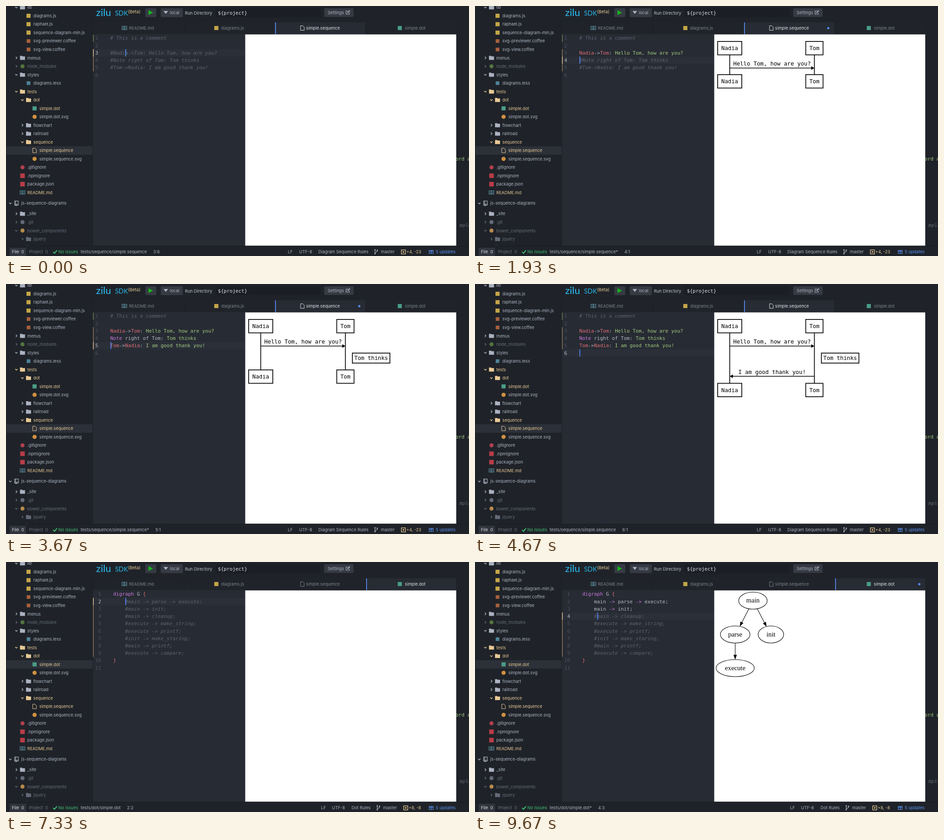
Recreate the animation shown at these times as an HTML page with a canvas. Size 1017 by 550 pixels, loop 9730 ms.

```html
<!DOCTYPE html>
<html lang="en">
<head>
<meta charset="utf-8">
<title>Diagram preview</title>
<style>
html, body { margin: 0; width: 100%; height: 100%; overflow: hidden; background: #1f2329; }
canvas { display: block; width: 1017px; height: 550px; }
</style>
</head>
<body>
<canvas id="stage"></canvas>
<script>
const W = 1017, H = 550, LOOP = 9730;
const canvas = document.getElementById('stage');
const ctx = canvas.getContext('2d');
const ratio = window.devicePixelRatio || 1;
canvas.width = W * ratio;
canvas.height = H * ratio;
ctx.scale(ratio, ratio);

const UI = '9.3px Inter, sans-serif';
const MONO = '"DejaVu Sans Mono", monospace';
const CODE = '10.83px ' + MONO;
const CHAR = 6.52, LINE = 16.23;
const C = {
  side: '#1f2329', editor: '#272b33', row: '#2c3139', line: '#2b2f38', text: '#abb2c0', dim: '#636a77',
  gold: '#e8c995', white: '#dfe2e8', blue: '#568af2', comment: '#5c6370', code: '#b2b9c6',
  red: '#e06c75', green: '#9fca80', purple: '#c678dd', js: '#c4a648', teal: '#4a9d86'
};

// ---------- helpers ----------
function rect(x, y, w, h, color) {
  ctx.fillStyle = color;
  ctx.fillRect(x, y, w, h);
}
function text(str, x, y, color = C.text, font = UI, align = 'left') {
  ctx.font = font;
  ctx.textAlign = align;
  ctx.fillStyle = color;
  ctx.fillText(str, x, y);
}
const label = (str, x, y, color, font) => text(str, x, y + 3.4, color, font);

function poly(points, color, fill = false, width = 1.2) {
  ctx.beginPath();
  points.forEach(([x, y], i) => i ? ctx.lineTo(x, y) : ctx.moveTo(x, y));
  if (fill) {
    ctx.fillStyle = color;
    ctx.fill();
  } else {
    ctx.strokeStyle = color;
    ctx.lineWidth = width;
    ctx.stroke();
  }
}
function box(x, y, w, h, color, width = 1) {
  ctx.strokeStyle = color;
  ctx.lineWidth = width;
  ctx.strokeRect(x, y, w, h);
}
function dot(x, y, r, color) {
  ctx.beginPath();
  ctx.arc(x, y, r, 0, Math.PI * 2);
  ctx.fillStyle = color;
  ctx.fill();
}
function button(x, y, w, h) {
  ctx.beginPath();
  ctx.roundRect(x, y, w, h, 2);
  ctx.fillStyle = '#353a43';
  ctx.fill();
}

// ---------- icons ----------
const icons = {
  folder(x, y, c) {
    rect(x - 5.5, y - 4.5, 5, 2, c);
    rect(x - 5.5, y - 3.3, 11, 7.8, c);
  },
  file(x, y, c) {
    poly([[x - 4, y - 5], [x + 1, y - 5], [x + 4, y - 2], [x + 4, y + 5], [x - 4, y + 5], [x - 4, y - 5]], c, false, 1);
  },
  book(x, y, c = '#5f91a3') {
    box(x - 5.5, y - 4, 5.5, 7.5, c);
    box(x, y - 4, 5.5, 7.5, c);
    for (let i = 0; i < 3; i++) {
      rect(x - 4, y - 2 + i * 2, 2.7, 0.8, c);
      rect(x + 1.4, y - 2 + i * 2, 2.7, 0.8, c);
    }
  },
  repo(x, y, c) {
    box(x - 4, y - 5, 8, 9, c, 1.2);
    rect(x - 2.5, y - 5, 1.2, 7, c);
    rect(x - 4, y + 1.5, 8, 1, c);
    rect(x - 2, y + 3, 2.5, 3, c);
  },
  js: (x, y) => rect(x - 4.5, y - 4.5, 9, 9, C.js),
  coffee: (x, y) => rect(x - 4, y - 4, 8, 8, '#a8603c'),
  node: (x, y) => dot(x, y, 4.5, '#52733f'),
  less: (x, y) => rect(x - 4, y - 4, 8, 8, '#4f8397'),
  graph: (x, y) => rect(x - 4.5, y - 4.5, 9, 9, C.teal),
  svg: (x, y) => dot(x, y, 4.6, '#cf9140'),
  git: (x, y, c) => dot(x, y, 4.5, c === C.text ? '#b1404d' : c),
  npm: (x, y) => rect(x - 5, y - 5, 10, 10, '#b83d48'),
  bower: (x, y) => dot(x, y, 4.5, '#b58a4c')
};

function chevron(x, y, open, c) {
  poly(open ? [[x - 2.5, y - 1.2], [x, y + 1.4], [x + 2.5, y - 1.2]]
            : [[x - 1.2, y - 2.7], [x + 1.4, y], [x - 1.2, y + 2.7]], c, false, 1.4);
}

// ---------- file tree: depth, icon, name, colour, open ----------
const { text: N, gold: G, dim: D } = C;
const tree = [
  [1, 'folder', 'lib', N, true],
  [2, 'js', 'diagrams.js', N],
  [2, 'js', 'raphael.js', N],
  [2, 'js', 'sequence-diagram-min.js', N],
  [2, 'coffee', 'svg-previewer.coffee', N],
  [2, 'coffee', 'svg-view.coffee', N],
  [1, 'folder', 'menus', N, false],
  [1, 'node', 'node_modules', D, false],
  [1, 'folder', 'styles', N, true],
  [2, 'less', 'diagrams.less', N],
  [1, 'folder', 'tests', G, true],
  [2, 'folder', 'dot', G, true],
  [3, 'graph', 'simple.dot', G],
  [3, 'svg', 'simple.dot.svg', N],
  [2, 'folder', 'flowchart', N, false],
  [2, 'folder', 'railroad', N, false],
  [2, 'folder', 'sequence', G, true],
  [3, 'file', 'simple.sequence', G],
  [3, 'svg', 'simple.sequence.svg', N],
  [1, 'git', '.gitignore', N],
  [1, 'npm', '.npmignore', N],
  [1, 'npm', 'package.json', N],
  [1, 'book', 'README.md', G],
  [0, 'repo', 'js-sequence-diagrams', N, true],
  [1, 'folder', '_site', N, false],
  [1, 'git', '.git', D, false],
  [1, 'bower', 'bower_components', D, true],
  [2, 'folder', 'jquery', D, false],
  [2, 'folder', '', D, false]
];
const treeY = i => i < 23 ? 3 + 18.52 * i : i === 23 ? 434 : 457 + 18.55 * (i - 24);

function drawTree(active) {
  ctx.save();
  ctx.beginPath();
  ctx.rect(0, 0, 190, 527);
  ctx.clip();
  tree.forEach(([depth, icon, name, color, open], i) => {
    const y = treeY(i), x = 33.5 + 13.25 * depth;
    if (name === active) rect(1, y - 9.2, 189, 18.5, C.row);
    if (open !== undefined) chevron(x - 24, y, open, color);
    icons[icon](x - 10.5, y, icon === 'book' ? undefined : color);
    label(name, x, y, color);
  });
  ctx.restore();
}

// ---------- documents ----------
const seqLines = [
  '# This is a comment', '',
  [['Nadia', C.red], ['->', C.code], ['Tom', C.red], [': ', C.code], ['Hello Tom, how are you?', C.green]],
  [['Note', C.purple], [' right of Tom: ', C.code], ['Tom thinks', C.green]],
  [['Tom', C.red], ['->', C.code], ['Nadia', C.red], [': ', C.code], ['I am good thank you!', C.green]],
  ''
];
const edge = (...names) => names.flatMap((n, i) =>
  i ? [['-> ', C.purple], [n + (i < names.length - 1 ? ' ' : ';'), C.code]] : [[n + ' ', C.code]]);
const dotLines = [
  [['digraph', C.purple], [' G ', C.code], ['{', C.red]],
  edge('main', 'parse', 'execute'), edge('main', 'init'), edge('main', 'cleanup'),
  edge('execute', 'make_string'), edge('execute', 'printf'), edge('init', 'make_staring'),
  edge('main', 'printf'), edge('execute', 'compare'),
  [['}', C.red]], ''
];
const docs = {
  seq: { name: 'simple.sequence', path: 'tests/sequence/simple.sequence', lines: seqLines, x: 229,
         first: 3, last: 5, info: ['LF', 619, 644, 'Diagram Sequence Rules', 686, 813, '+4, -23'] },
  dot: { name: 'simple.dot', path: 'tests/dot/simple.dot', lines: dotLines, x: 235.5,
         first: 2, last: 9, info: ['LF', 692, 716, 'Dot Rules', 759, 818, '+8, -8'] }
};

// ---------- timeline: each step changes only the fields it names ----------
const steps = [
  { t: 0, doc: 'seq', row: 3, col: 6, done: 0, shown: 0, dirty: false, hover: false },
  { t: 600, col: 5 }, { t: 700, col: 4 }, { t: 800, col: 3 }, { t: 900, col: 2 },
  { t: 1070, col: 1, done: 1 },
  { t: 1330, shown: 1, dirty: true },
  { t: 1870, row: 4 }, { t: 2070, col: 2 },
  { t: 2270, col: 1, done: 2 }, { t: 2530, shown: 2 },
  { t: 3070, row: 5 }, { t: 3270, col: 2 },
  { t: 3470, col: 1, done: 3 }, { t: 3730, shown: 3 },
  { t: 4200, dirty: false }, { t: 4330, row: 6 },
  { t: 4800, doc: 'dot', row: 2, col: 3, done: 0, shown: 0, hover: true },
  { t: 6330, hover: false },
  { t: 7070, col: 2 },
  { t: 7470, done: 1 }, { t: 7730, shown: 1, dirty: true },
  { t: 8130, row: 3 }, { t: 8330, col: 3 },
  { t: 8530, col: 2, done: 2 }, { t: 8800, shown: 2 },
  { t: 9200, row: 4 }, { t: 9470, col: 3 }
];
function stateAt(t) {
  const s = { moved: 0 };
  for (const step of steps) {
    if (step.t > t) break;
    Object.assign(s, step);
    if ('row' in step || 'col' in step) s.moved = step.t;
  }
  s.caret = (t - s.moved) % 800 < 400;
  return s;
}

// ---------- editor ----------
function drawEditor(s) {
  const doc = docs[s.doc];
  const lineY = n => 70.5 + (n - 1) * LINE;
  rect(191, 62, 335, 466, C.editor);
  rect(193, lineY(s.row) - 8, 332, 16.2, C.line);

  if (s.doc === 'seq') rect(191, 63, 1.5, 16, '#737c55');
  const firstMark = s.doc === 'dot' ? doc.first + s.done : doc.first;
  for (let n = firstMark; n <= doc.last; n++)
    rect(191, lineY(n) - 8, 1.5, LINE, n === s.row ? C.gold : '#8f7a5c');

  doc.lines.forEach((line, i) => {
    const n = i + 1, y = lineY(n) + 3.9;
    text(n, doc.x - 26.5, y, n === s.row ? C.code : '#495060', CODE, 'right');
    const editable = n >= doc.first && n <= doc.last;
    let x = doc.x + (s.doc === 'dot' && editable ? 4 * CHAR : 0);
    if (typeof line === 'string') {
      text(line, x, y, C.comment, 'italic ' + CODE);
    } else if (editable && n - doc.first >= s.done) {
      text('#' + line.map(p => p[0]).join(''), x, y, C.comment, 'italic ' + CODE);
    } else {
      for (const [part, color] of line) {
        text(part, x, y, color, CODE);
        x += part.length * CHAR;
      }
    }
  });
  if (s.caret) {
    const tab = s.doc === 'dot' ? 3 : 0;
    rect(doc.x + 0.5 + (s.col - 1 + tab) * CHAR, lineY(s.row) - 8, 1.7, 16, '#528bff');
  }
}

// ---------- preview ----------
const INK = '#000';
function arrow(x1, y1, x2, y2, len, half, width) {
  const a = Math.atan2(y2 - y1, x2 - x1), ux = Math.cos(a), uy = Math.sin(a);
  const bx = x2 - ux * len, by = y2 - uy * len;
  poly([[x1, y1], [bx, by]], INK, false, width);
  poly([[x2, y2], [bx - uy * half, by + ux * half], [bx + uy * half, by - ux * half]], INK, true);
}
function drawSequence(stage) {
  const font = '12.3px ' + MONO, left = 559.5, right = 745.5;
  const bottom = [0, 151, 189, 218.5][stage];
  for (const [name, x, w] of [['Nadia', left, 53], ['Tom', right, 38]]) {
    poly([[x, 107], [x, bottom]], INK, false, 1.7);
    for (const y of [78, bottom]) {
      box(x - w / 2, y, w, 29.5, INK, 1.7);
      text(name, x, y + 19.3, INK, font, 'center');
    }
  }
  text('Hello Tom, how are you?', 652.5, 131, INK, font, 'center');
  arrow(left, 136.5, right, 136.5, 7, 4, 1.7);
  if (stage > 1) {
    box(760.8, 152, 82.5, 22, INK, 1.7);
    text('Tom thinks', 802, 167.3, INK, font, 'center');
  }
  if (stage > 2) {
    text('I am good thank you!', 652.5, 197.5, INK, font, 'center');
    arrow(right, 203, left, 203, 7, 4, 1.7);
  }
}
function graphNode(name, x, y, rx) {
  ctx.beginPath();
  ctx.ellipse(x, y, rx, 18.7, 0, 0, Math.PI * 2);
  ctx.strokeStyle = INK;
  ctx.lineWidth = 1.1;
  ctx.stroke();
  text(name, x, y + 4.4, INK, '14.7px "Liberation Serif", serif', 'center');
}
function drawGraph(stage) {
  const x = 571.5, top = stage > 1 ? 610.5 : x;
  graphNode('main', top, 85, 31.3);
  graphNode('parse', x, 159.5, 32.5);
  graphNode('execute', x, 233.5, 42);
  arrow(x, 178.2, x, 214.8, 10.5, 3.7, 1.1);
  if (stage > 1) {
    graphNode('init', 650, 159.5, 28);
    arrow(601.5, 103, 581.5, 142, 10.5, 3.7, 1.1);
    arrow(620, 103, 640.5, 142.5, 10.5, 3.7, 1.1);
  } else {
    arrow(x, 103.7, x, 140.8, 10.5, 3.7, 1.1);
  }
}

// ---------- chrome ----------
function drawHeader() {
  text('zilu', 198, 22, '#2cb4e6', '500 22px Lato, sans-serif');
  text('SDK', 239.5, 21, '#2cb4e6', '14.5px Lato, sans-serif');
  text('(Beta)', 268, 16, C.gold, '9.6px Inter, sans-serif');
  button(306, 5, 24, 19.5);
  poly([[313, 9.3], [323, 14.5], [313, 19.7]], '#16b51b', true);
  button(340, 5, 48.5, 19.5);
  poly([[346, 11], [356, 11], [351, 17.5]], C.text, true);
  label('local', 360, 15, C.text);
  label('Run Directory', 393, 16, '#bcc2cd');
  rect(460, 5, 231, 20, '#1b1e24');
  text('${project}', 465.5, 19, C.white, '10.7px ' + MONO);
  button(699, 5, 64.5, 19);
  label('Settings', 706.5, 14.5, C.text);
  poly([[752, 11], [747, 11], [747, 18], [754, 18], [754, 15]], C.text);
  poly([[750, 15.2], [755.5, 10]], C.text, false, 2);
}
function drawTabs(s) {
  const seq = s.doc === 'seq', left = seq ? 592 : 792, faded = '#7a818e';
  rect(191, 35, 799, 27.5, '#20242a');
  for (const x of [391, 591, 790, 989]) rect(x, 36, 1, 26, '#1c1f25');
  rect(left, 36, 197, 27, C.editor);
  rect(left - 1, 36, 1.8, 26, C.blue);
  icons.book(260, 48.5);
  label('README.md', 270, 48.5, faded);
  icons.js(462, 48.5);
  label('diagrams.js', 472.5, 48.5, faded);
  icons.file(651, 48.5, seq ? C.white : faded);
  label('simple.sequence', 659, 48.5, seq ? C.white : faded);
  icons.graph(865, 48.5);
  label('simple.dot', 876, 48.5, seq ? faded : C.white);
  if (s.hover) {
    poly([[973.5, 46], [978.5, 51]], C.white, false, 1.5);
    poly([[978.5, 46], [973.5, 51]], C.white, false, 1.5);
  } else if (s.dirty) {
    dot(left + 184, 48.7, 2.5, C.blue);
  }
}
function drawStatus(s) {
  const doc = docs[s.doc], y = 541;
  const [eol, eolX, encX, rules, rulesX, branch, diff] = doc.info;
  rect(0, 528, W, 22, C.side);
  rect(0, 527.5, W, 1, '#1a1d22');
  rect(8, 532, 36, 18, '#30353e');
  label('File  0', 13, y, C.white);
  label('Project  0', 50.5, y, '#6b727f');
  poly([[103.5, 541], [106.5, 544], [112, 537.5]], '#3fbf72', false, 2);
  label('No Issues', 115, y, '#3fbf72');
  const path = doc.path + (s.dirty ? '*' : '');
  label(path, 164, y);
  label(s.row + ':' + s.col, 164 + ctx.measureText(path).width + 14, y);
  label(eol, eolX, y);
  label('UTF-8', encX, y);
  label(rules, rulesX, y);

  poly([[branch - 2.5, 537], [branch - 2.5, 545]], C.text);
  poly([[branch + 2.5, 538], [branch + 2.5, 540], [branch - 2.5, 543]], C.text);
  for (const [dx, dy] of [[-2.5, 536.5], [2.5, 537.5], [-2.5, 545]]) dot(branch + dx, dy, 1.4, C.text);
  label('master', branch + 10.5, y);
  box(branch + 55.5, 536.5, 9, 9, C.gold, 1.3);
  rect(branch + 58.5, 539.5, 3, 3, C.gold);
  label(diff, branch + 66.5, y, C.gold);

  const blue = '#5c93f5';
  box(929.5, 537.5, 9, 7, blue);
  poly([[929.5, 539.8], [938.5, 539.8]], blue);
  poly([[934, 537.5], [934, 544.5]], blue);
  label('5 updates', 944, y, blue);
}
function drawEdge() {
  rect(990, 30, 27, 498, '#1f2228');
  text('ord a', 987.5, 340, C.green, CODE);
  text('mple', 996, 486, '#5f6672', 'italic ' + CODE);
}

function draw(t) {
  const s = stateAt(t);
  rect(0, 0, W, H, C.side);
  drawTree(docs[s.doc].name);
  rect(190, 30, 1, 498, '#1a1d22');
  drawHeader();
  drawEdge();
  drawTabs(s);
  drawEditor(s);
  rect(525.5, 62.5, 463.5, 465, '#fff');
  if (s.shown) (s.doc === 'seq' ? drawSequence : drawGraph)(s.shown);
  drawStatus(s);
}

function tick() {
  draw(performance.now() % LOOP);
  requestAnimationFrame(tick);
}
tick();
</script>
</body>
</html>
```
